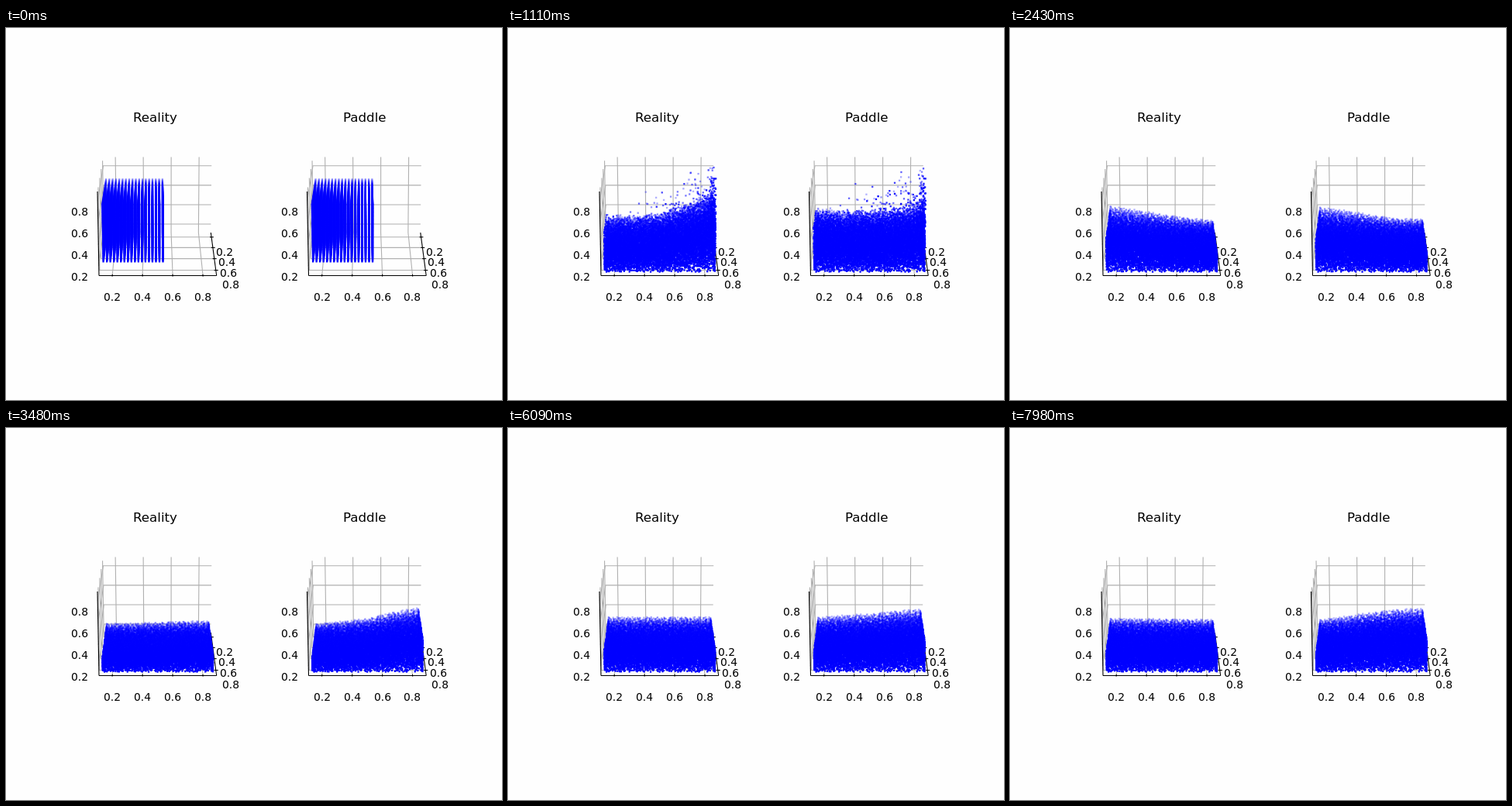
An HTML page with a canvas for the animation above (8010 ms loop, 640x480 px).

```html
<!DOCTYPE html>
<html lang="en">
<head>
<meta charset="utf-8">
<title>Reality and Paddle</title>
<style>
  html, body { margin: 0; width: 100%; height: 100%; overflow: hidden; background: #fefefe; }
  svg, canvas { position: absolute; left: 0; top: 0; width: 640px; height: 480px; }
  text { font-family: "DejaVu Sans", sans-serif; font-size: 13.89px; }
  .title { font-size: 16.67px; }
  path { fill: none; stroke-width: 1.11; }
  .grid { stroke: #b0b0b0; }
  .axis { stroke: #000; }
</style>
</head>
<body>
<svg id="axes" viewBox="0 0 640 480"></svg>
<canvas id="water" width="640" height="480"></canvas>
<script>
const LOOP = 8010, STEP = 30, SHIFT = 270.5;
const mix = (a, b, k) => a + (b - a) * k;

// Unit box to stage: x across, z up, q from the back wall (0) to the front (1).
function project(x, z, q) {
  const left = mix(mix(127, 125.3, z), mix(120, 118, z), q);
  const right = mix(mix(264.3, 265.4, z), mix(271.7, 273.7, z), q);
  return [mix(left, right, x), mix(264 - 97.5 * z, 319.5 - 108.5 * z, q)];
}

function drawAxes(title, dx) {
  const ticks = [0.113, 0.37, 0.627, 0.884];
  const line = (cls, ...pts) => {
    const d = pts.map(([x, z, q]) => {
      const [px, py] = project(x, z, q);
      return (px + dx).toFixed(2) + " " + py.toFixed(2);
    }).join("L");
    return `<path class="${cls}" d="M${d}"/>`;
  };
  // Text starts on whole pixels.
  const label = (s, x, y, cls = "") => `<text class="${cls}" x="${Math.round(x + dx)}" y="${y}">${s}</text>`;
  let out = label(title, 164.3, 121, "title");
  ticks.forEach(v => {
    const q = v / (1.094 - 0.094 * v);
    out += line("grid", [v, 1, 0], [v, 0, 0], [v, 0, 1]);
    out += line("grid", [1, v, 0], [0, v, 0], [0, v, 1]);
    out += line("grid", [0, 1, q], [0, 0, q], [1, 0, q]);
  });
  out += line("axis", [0, 0, 1], [1, 0, 1]);
  out += line("axis", [0, 1, 1], [0, 0, 1]);
  out += line("axis", [1, 0, 0], [1, 0, 1]);
  ticks.forEach((v, i) => {
    const q = v / (1.094 - 0.094 * v), s = "0." + (2 * i + 2);
    out += line("axis", [v, 0, 0.97], [v, 0, 1.02]);
    out += line("axis", [0.985, 0, q], [1.02, 0, q]);
    out += label(s, 126.4 + 38.8 * i, 352);
    out += label(s, 84.4, 326 - 28 * i);
    out += label(s, 271.3 + 2.5 * i, [294, 307, 321, 336][i]);
  });
  return out;
}

// A pose of the water: surface heights at five places from left to right,
// and the sheet thrown up by the front wall between lo and hi.
function pose(t, top, o = {}) {
  const floor = o.floor ?? 0.02;
  return {
    t,
    v: [o.end ?? 0.97, o.front ?? 0.95, floor, o.sheet ?? 0.12, o.spray ?? 0, o.skew ?? 1,
      ...top, ...(o.lo ?? top.map(() => floor)), ...(o.hi ?? top)]
  };
}
const flat = h => Array(5).fill(h);
const block = pose(0, flat(0.765), { end: 0.545, front: 0.82, floor: 0.077 });

const reality = [
  block,
  pose(210, [0.64, 0.63, 0.58, 0.45, 0.2], { end: 0.76 }),
  pose(390, [0.5, 0.46, 0.38, 0.24, 0.1], {
    sheet: 0.5, lo: flat(0.02), hi: [0.68, 0.64, 0.5, 0.35, 0.25] }),
  pose(660, [0.36, 0.28, 0.17, 0.08, 0.14], {
    sheet: 0.78, spray: 0.5, skew: 1.3, lo: flat(0.1), hi: [0.89, 0.88, 0.88, 0.9, 0.92] }),
  pose(1020, [0.26, 0.26, 0.3, 0.42, 0.6], {
    sheet: 0.5, spray: 0.42, hi: [0.5, 0.48, 0.5, 0.62, 0.78] }),
  pose(1590, [0.38, 0.48, 0.55, 0.59, 0.62]),
  pose(2340, [0.42, 0.37, 0.31, 0.26, 0.22]),
  pose(2940, [0.27, 0.27, 0.26, 0.25, 0.26]),
  pose(3480, [0.185, 0.19, 0.2, 0.215, 0.215]),
  pose(4080, [0.27, 0.25, 0.24, 0.25, 0.27]),
  pose(4740, flat(0.26)),
  pose(6090, flat(0.27)),
  pose(7980, [0.25, 0.25, 0.245, 0.24, 0.235])
];
const paddle = [
  block,
  pose(210, [0.7, 0.69, 0.62, 0.5, 0.3], { end: 0.68 }),
  pose(420, [0.66, 0.62, 0.46, 0.24, 0.08], {
    sheet: 0.5, skew: 1.2, hi: [0.8, 0.82, 0.78, 0.55, 0.32] }),
  pose(660, [0.66, 0.62, 0.4, 0.06, 0.07], {
    sheet: 0.78, skew: 1.6, lo: [0.02, 0.05, 0.4, 0.8, 0.76], hi: [0.98, 1.05, 1.07, 0.93, 0.8] }),
  pose(1020, [0.38, 0.34, 0.32, 0.34, 0.45], {
    sheet: 0.5, spray: 0.45, hi: [0.55, 0.55, 0.56, 0.6, 0.68] }),
  pose(1590, [0.43, 0.37, 0.46, 0.38, 0.38], { spray: 0.08 }),
  pose(2340, [0.4, 0.36, 0.3, 0.25, 0.24]),
  pose(2940, [0.34, 0.31, 0.27, 0.25, 0.25]),
  pose(3480, [0.18, 0.215, 0.25, 0.335, 0.39]),
  pose(3960, [0.16, 0.18, 0.25, 0.38, 0.52]),
  pose(4740, [0.21, 0.25, 0.295, 0.32, 0.315]),
  pose(5340, [0.31, 0.3, 0.3, 0.31, 0.31]),
  pose(6090, [0.265, 0.295, 0.31, 0.35, 0.37]),
  pose(6990, [0.25, 0.28, 0.32, 0.36, 0.39]),
  pose(7980, [0.235, 0.28, 0.33, 0.37, 0.38])
];

function poseAt(poses, t) {
  let i = 0;
  while (i < poses.length - 2 && t > poses[i + 1].t) i++;
  const a = poses[i], b = poses[i + 1];
  const k = Math.min(1, (t - a.t) / (b.t - a.t));
  const ease = k * k * (3 - 2 * k);
  return a.v.map((v, n) => mix(v, b.v[n], ease));
}

// Seeded lattice of drops, ordered from back to front.
let seed = 7;
const rnd = () => (seed = (seed * 16807) % 2147483647) / 2147483647;
const NX = 18, ND = 28, NZ = 30;
const drops = [];
for (let d = 0; d < ND; d++)
  for (let i = 0; i < NX; i++)
    for (let k = 0; k < NZ; k++)
      drops.push({ d, i, k, jx: rnd(), jd: rnd(), jz: rnd(), kind: rnd(), lift: rnd(), flung: rnd() < 0.025 });

const ctx = document.getElementById("water").getContext("2d");
const DOT = 2.3;

function drawWater(poses, share, dx, t) {
  const v = poseAt(poses, t);
  const [end, front, floor, sheet, spray, skew] = v;
  const loose = Math.min(1, t / 400);
  // Drops wander about their lattice place and gather at the walls.
  const place = (n, j, count) =>
    Math.min(1, Math.max(0, (n + (j - 0.5) * loose) / (count - 1)));
  const level = (row, u) => {
    const s = Math.min(3.999, u * 4), n = 6 + row * 5 + Math.floor(s);
    return mix(v[n], v[n + 1], s % 1);
  };
  for (const p of drops) {
    const thrown = p.kind < share;
    let u = place(p.i, p.jx, NX) ** skew;
    if (p.flung) u = mix(u, 1 - (1 - u) ** 3 * 0.9, Math.min(1, spray * 2.5));
    const lo = thrown ? level(1, u) : floor;
    const hi = level(thrown ? 2 : 0, u);
    let z = mix(lo, hi, place(p.k, p.jz, NZ));
    if (p.flung) z += spray * p.lift * (0.6 + u);
    const q = mix(thrown ? sheet : 0.12, front, place(p.d, p.jd, ND));
    const [x, y] = project(mix(0.03, end, u), Math.min(z, 1.1), q);
    ctx.globalAlpha = mix(0.3, 1, (q - 0.12) / (front - 0.12));
    ctx.fillRect(x + dx - DOT / 2, y - DOT / 2, DOT, DOT);
  }
}

let shown = -1;
function tick() {
  const step = Math.floor((performance.now() % LOOP) / STEP);
  if (step !== shown) {
    shown = step;
    ctx.clearRect(0, 0, 640, 480);
    ctx.fillStyle = "#00f";
    drawWater(reality, 0.2, 0, step * STEP);
    drawWater(paddle, 0.3, SHIFT, step * STEP);
  }
  requestAnimationFrame(tick);
}

document.getElementById("axes").innerHTML = drawAxes("Reality", 0) + drawAxes("Paddle", SHIFT);
tick();
</script>
</body>
</html>
```
